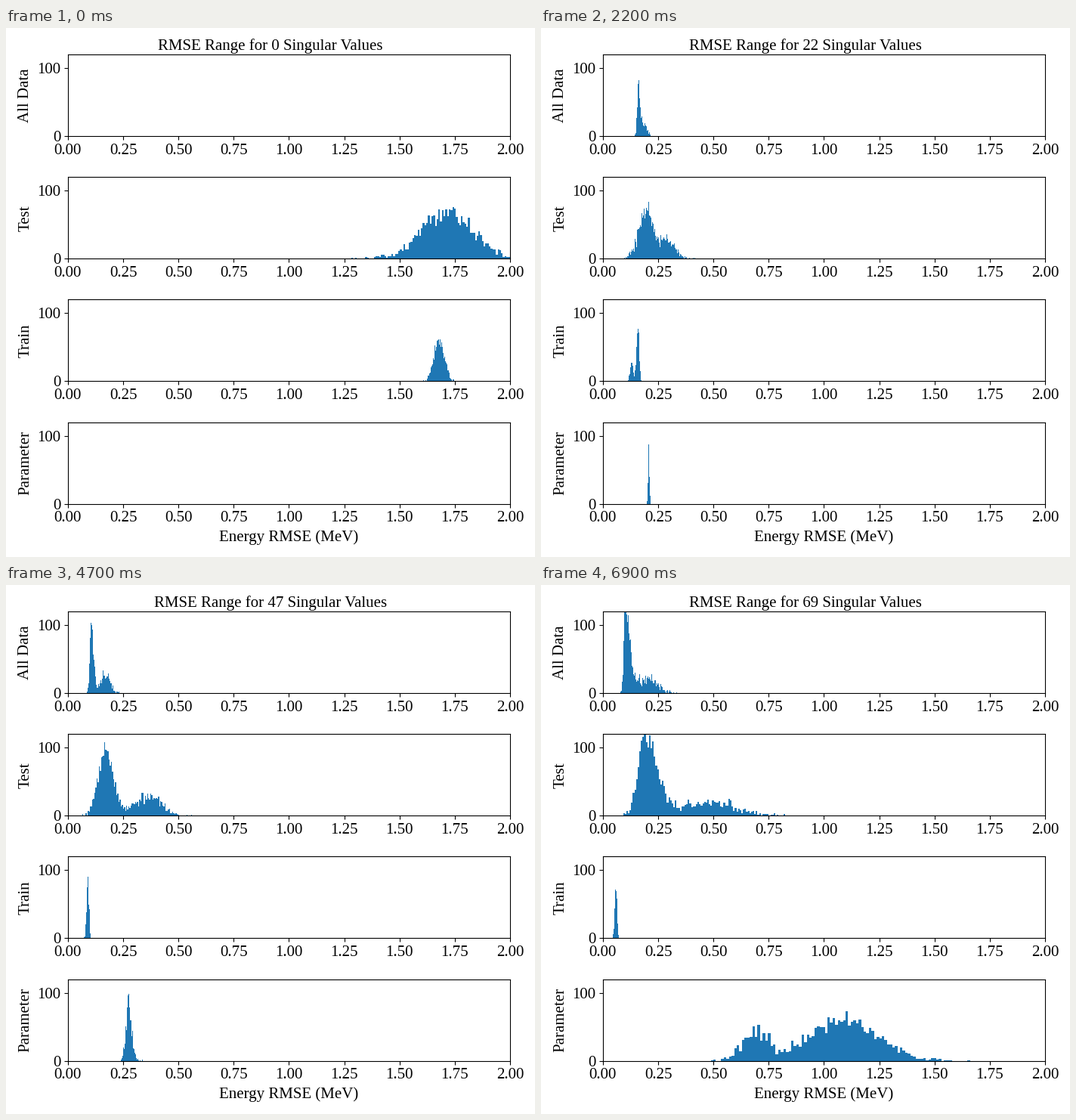
Write a matplotlib script that moves like this. It is 700 px wide and 700 px high and loops after 7000 ms.

```python
import matplotlib.pyplot as plt
import numpy as np
from matplotlib.animation import FuncAnimation

SIZE, DPI = 700, 100
FRAMES, INTERVAL = 70, 100
SAMPLES, BINS = 2500, 100
LEFT, WIDTH, HEIGHT = 81.9, 585, 108
FIRST_BOTTOM, STEP = 143, 162.2

plt.rcParams.update({"font.family": "Liberation Serif", "font.size": 15})


def error(n):
    """Typical error: a steep drop, then a slow decay to a floor."""
    return 0.1 + 0.56 * np.exp(-n / 10) + 1.02 * np.exp(-n / 2)


# Each model returns the main peak, its left and right spread, the distance
# to the second peak, that peak's spread and its share of the samples.
# u is the progress from 0 to 1.

def all_data(n, u):
    left = 0.006
    right = left + 0.016 * u**3
    share = 0.37 * np.tanh((n / 22) ** 2)
    return error(n), left, right, 0.1 * u**1.2, 0.01 + 0.036 * u**3, share


def test(n, u):
    mid = 1.02 * error(n) + 0.0013 * n
    left = 0.032 + 0.083 * np.exp(-n / 4)
    right = left + 0.025 * u**4
    return mid, left, right, 0.0042 * n, 0.035 + 0.08 * u**3, 0.33 * np.tanh(n / 5)


def train(n, u):
    mid = error(n) * (1 - 0.41 * u**3)
    early = np.exp(-n / 4)
    left = 0.008 - 0.003 * u + 0.015 * early
    right = 0.005 + 0.018 * early
    gap = -0.02 - 0.09 * np.exp(-n / 9)
    return mid, left, right, gap, 0.007, 0.3 * np.sin(np.pi * min(n / 40, 1))


def parameter(n, u):
    surge = np.exp((n - FRAMES + 1) / 4)
    rise = 1 - np.exp(-((n / 5.6) ** 2))
    mid = (0.15 + 0.0026 * n) * rise + 0.75 * surge
    spread = 0.026 * u**1.85 + 0.12 * surge
    return mid, spread, 1.1 * spread, -0.39 * surge, 0.45 * spread, 0.2


# Label, model and the first count at which the panel has data.
PANELS = [("All Data", all_data, 1), ("Test", test, 0),
          ("Train", train, 0), ("Parameter", parameter, 1)]


def histogram(model, n, seed):
    """Bin random samples of a skewed main peak plus a second peak."""
    mid, left, right, gap, spread, share = model(n, n / (FRAMES - 1))
    rng = np.random.default_rng([seed, n])
    z = rng.standard_normal(SAMPLES)
    on_left = rng.random(SAMPLES) < left / (left + right)
    main = mid + np.abs(z) * np.where(on_left, -left, right)
    second = mid + gap + z * spread
    values = np.where(rng.random(SAMPLES) < share, second, main)
    return np.histogram(values, BINS)


def add_panel(row, label):
    bottom = FIRST_BOTTOM + row * STEP
    ax = fig.add_axes([LEFT / SIZE, 1 - bottom / SIZE, WIDTH / SIZE, HEIGHT / SIZE])
    bars = ax.stairs(np.zeros(BINS), np.linspace(0, 1, BINS + 1),
                     fill=True, facecolor="tab:blue")
    ax.set(xlim=(0, 2), ylim=(0, 120), ylabel=label,
           xticks=np.arange(0, 2.01, 0.25), yticks=[0, 100])
    return ax, bars


fig = plt.figure(figsize=(SIZE / DPI, SIZE / DPI), dpi=DPI)
title = fig.suptitle("", fontsize=15)
axes, all_bars = zip(*(add_panel(row, panel[0]) for row, panel in enumerate(PANELS)))
axes[-1].set_xlabel("Energy RMSE (MeV)")


def update(n):
    title.set_text(f"RMSE Range for {n} Singular Values")
    for seed, (bars, (_, model, start)) in enumerate(zip(all_bars, PANELS)):
        bars.set_visible(n >= start)
        if n >= start:
            bars.set_data(*histogram(model, n, seed))
    return [title, *all_bars]


anim = FuncAnimation(fig, update, frames=FRAMES, interval=INTERVAL,
                     repeat=True, repeat_delay=0)
plt.show()
```
